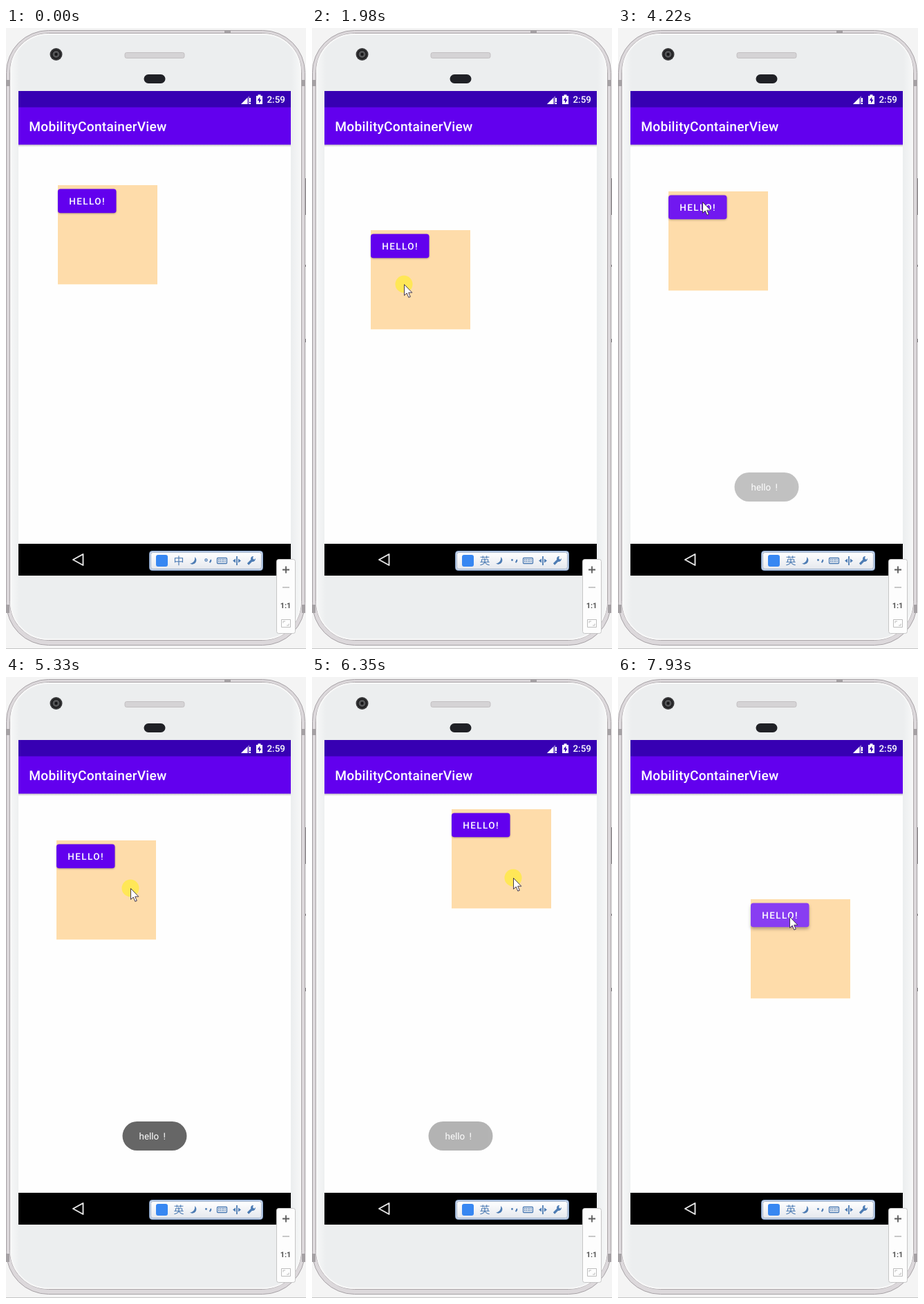
An HTML page that plays this animation: 434 px wide and 897 px high, repeating every 8000 ms.

```html
<!DOCTYPE html>
<html lang="en">
<head>
<meta charset="utf-8">
<title>MobilityContainerView</title>
<style>
  html, body { margin: 0; width: 100%; height: 100%; overflow: hidden; background: #f4f4f4; }
  svg { display: block; width: 434px; height: 897px; }
  text { font-family: Roboto, sans-serif; font-size: 13.4px; fill: #fff; text-rendering: geometricPrecision; }
  .medium { font-weight: 500; }
  .title { font-size: 19.16px; letter-spacing: .24px; }
  .caps { letter-spacing: 1.5px; }
  .line { fill: none; }
  #mode { font: 15px "Noto Sans CJK SC", "Noto Sans CJK", sans-serif; fill: #4d7cb4; text-anchor: middle; }
  .ratio { font-size: 11px; font-weight: 700; fill: #555; text-anchor: middle; }
</style>
</head>
<body>
<svg viewBox="0 0 434 897">
  <defs>
    <linearGradient id="face">
      <stop offset="0" stop-color="#f7f8f8"/><stop offset=".035" stop-color="#eceeef"/>
      <stop offset=".965" stop-color="#eceeef"/><stop offset="1" stop-color="#f7f8f8"/>
    </linearGradient>
    <linearGradient id="barShade" x2="0" y2="1">
      <stop offset="0" stop-opacity=".25"/><stop offset="1" stop-opacity="0"/>
    </linearGradient>
    <linearGradient id="imeFill" x2="0" y2="1">
      <stop offset="0" stop-color="#fff"/><stop offset="1" stop-color="#e5e8ee"/>
    </linearGradient>
  </defs>

  <!-- Phone -->
  <path d="M0 896.5H434" stroke="#c4c4c4"/>
  <path d="M432 217h2v53h-2zM432 342h2v3h-2zM432 449h2v5h-2z" fill="#8f8b8e"/>
  <rect x=".5" y="3.500" width="432" height="888" rx="61" fill="#dcd8db" stroke="#a7a2a6"/>
  <path d="M316 3h9v5h-9zM0 75h5v9H0zM428 75h5v9h-5zM0 833h5v12H0zM428 833h5v12h-5z" fill="#a5a1a4"/>
  <rect x="5.500" y="7.500" width="422" height="877" rx="56" fill="url(#face)" stroke="#aaa5a8"/>
  <rect x="7" y="9" width="419" height="874" rx="54" class="line" stroke="#f8f8f8" stroke-width="2"/>
  <g transform="translate(72.500 38)">
    <circle r="9" fill="#39393b"/>
    <circle r="6" fill="#555658" stroke="#202022" stroke-width="2"/>
    <circle r="2.200" fill="#171719"/>
  </g>
  <rect x="172" y="35.500" width="86" height="8" rx="2.500" fill="#d5d3d5" stroke="#c3c0c2"/>
  <rect x="199.500" y="67" width="31" height="13" rx="6.500" fill="#202126"/>

  <!-- Screen -->
  <path d="M18 91H412V791H18z" fill="#fefefe"/>
  <path d="M18 168H412V172H18z" fill="url(#barShade)"/>
  <path d="M18 91H412V168.500H18z" fill="#6200ee"/>
  <path d="M18 91H412V114.500H18z" fill="#3700b3"/>
  <path d="M18 745H412V791H18z"/>
  <g fill="#fff">
    <path d="M340 110L352 98V110z" opacity=".45"/>
    <path d="M340 110L349 101V110zM352 101h2v6h-2zM352 108h2v2h-2z"/>
    <path d="M362 98h2.500v-1.700h4V98H371v12H362z"/>
  </g>
  <path d="M367.300 99.500L363.700 104.700H366V108.700L369.500 103.500H367.300z" fill="#3700b3"/>
  <text class="medium" x="377.500" y="108">2:59</text>
  <text class="medium title" x="33.300" y="149">MobilityContainerView</text>
  <path d="M97 768L111.500 760V776z" class="line" stroke="#e6e6e6" stroke-width="1.900" stroke-linejoin="round"/>

  <g id="box">
    <rect width="144" height="143.300" fill="#fedcaa"/>
    <rect id="button" y="5.500" width="84.500" height="34.800" rx="3.800" fill="#6200ee"/>
    <text class="medium caps" x="16.200" y="28">HELLO!</text>
  </g>

  <g id="toast">
    <rect x="168.500" y="642" width="93" height="42" rx="21" fill="#666"/>
    <text x="192.500" y="668">hello<tspan x="227.500">!</tspan></text>
  </g>

  <!-- Input method bar -->
  <rect x="207.500" y="755.500" width="164" height="28" rx="4" fill="#d4e0f1" stroke="#7796c2"/>
  <rect x="209.500" y="757.500" width="160" height="24" rx="3" fill="url(#imeFill)" stroke="#9fb1cb"/>
  <rect x="217" y="761" width="17" height="17" rx="3" fill="#3787f2"/>
  <text id="mode" x="250" y="775"></text>
  <g fill="#4d7cb4">
    <path d="M273 764A5.700 5.700 0 1 1 266 773.500C271 773 274 769 273 764z"/>
    <path d="M328 769.500l4-3v6zM340 769.500l-4-3v6z"/>
    <path d="M354 767q0-4 4-4l-1 3 2 2 2-2q0 5-5 5z"/>
  </g>
  <g class="line" stroke="#4d7cb4" stroke-width="1.300">
    <circle id="stop" cx="289.500" cy="768.500"/>
    <path d="M296 768q1 2-1.500 4" stroke-width="2"/>
    <rect x="305.500" y="765.500" width="14" height="8" rx="1"/>
    <path d="M307 768H318M307 770.500H318" stroke-dasharray="1.500 1"/>
    <path d="M334 763V776" stroke-width="1.800"/>
    <path d="M350 774.500L356 768.500" stroke-width="3.200"/>
  </g>

  <!-- Emulator zoom panel -->
  <rect x="391.500" y="767.500" width="27" height="107" rx="3" fill="#fdfdfd" stroke="#c6c6c6"/>
  <path d="M400 782.500H410M405 777.500V787.500" stroke="#5c5c5c" stroke-width="1.800"/>
  <path d="M400 808H410" stroke="#bbb" stroke-width="1.600"/>
  <text class="ratio" x="404.500" y="838">1:1</text>
  <path d="M398.500 854.500h13v11h-13zM401 859.500V857H404M406 863H409V860.500" class="line" stroke="#bdbdbd"/>

  <g id="cursor">
    <circle id="press" r="12.500" fill="#ffeb3b" fill-opacity=".75"/>
    <path d="M.5.500V16.300L4.200 13 6.800 19.200 9.300 18.200 6.700 12.200H11.800z" fill="#fff" stroke="#33263f" stroke-width=".9"/>
  </g>
</svg>
<script>
  const LOOP = 8000;
  const el = id => document.getElementById(id);
  const [box, button, toast, mode, stop, cursor, press] =
    ['box', 'button', 'toast', 'mode', 'stop', 'cursor', 'press'].map(el);

  const ramp = (t, from, to) => Math.min(1, Math.max(0, (t - from) / (to - from)));
  const ease = k => k * k * (3 - 2 * k);
  const mix = (a, b, k) => a + (b - a) * k;

  // The pointer rests between glides; each one eases to a new spot.
  const entry = { x: 200, y: 649 };
  const home = { x: 75, y: 227 };
  const glides = [];
  const glide = (start, end, x, y) => glides.push({ start, end, x, y });
  glide(430, 970, 123, 305);
  glide(1220, 1540, 94, 334);
  glide(1540, 1815, 133, 370);
  glide(2060, 2450, 121, 314);
  glide(3240, 3580, 122, 251);
  glide(4350, 4840, 162, 335);
  glide(5165, 5330, 180, 305);
  glide(5330, 5790, 291, 290);
  glide(6400, 6600, 235, 405);
  glide(6660, 6760, 280, 406);
  glide(6760, 6850, 281, 420);
  glide(7080, 7520, 248, 346);

  // The box repeats each stretch of pointer travel a little later.
  const drags = [
    { from: 1220, to: 1815, shownFrom: 1320, shownTo: 1980 },
    { from: 2060, to: 2450, shownFrom: 2690, shownTo: 2890 },
    { from: 5165, to: 5790, shownFrom: 5335, shownTo: 5950 },
    { from: 6400, to: 6850, shownFrom: 6560, shownTo: 7010 }
  ];
  const holds = [[1220, 2060], [3560, 3800], [5140, 7000], [7520, 7850]];

  function pointerAt(t) {
    return glides.reduce((at, g) => {
      const k = ease(ramp(t, g.start, g.end));
      return { x: mix(at.x, g.x, k), y: mix(at.y, g.y, k) };
    }, entry);
  }

  function boxAt(t) {
    return drags.reduce((at, d) => {
      const grab = pointerAt(d.from);
      const now = pointerAt(mix(d.from, d.to, ramp(t, d.shownFrom, d.shownTo)));
      return { x: at.x + now.x - grab.x, y: at.y + now.y - grab.y };
    }, home);
  }

  const place = (node, { x, y }) => node.setAttribute('transform', `translate(${x} ${y})`);
  const show = (node, on) => node.style.display = on ? '' : 'none';

  function draw(t) {
    place(box, boxAt(t));
    place(cursor, pointerAt(t));
    show(cursor, t >= 430);
    show(press, holds.some(([from, to]) => t >= from && t < to));

    const lift = ramp(t, 3740, 3900) - ramp(t, 4070, 4320) + ramp(t, 7670, 7920);
    button.style.fill = `color-mix(in srgb, #6200ee, #fff ${24 * lift}%)`;
    button.style.filter = `drop-shadow(0 ${1 + 2 * lift}px ${1 + lift}px rgba(0,0,0,.28))`;
    toast.style.opacity = ramp(t, 4070, 4450) - ramp(t, 6040, 6650);

    const english = t >= 1220;
    mode.textContent = english ? '英' : '中';
    stop.setAttribute('r', english ? 0.8 : 1.6);
  }

  function tick(now) {
    draw(now % LOOP);
    requestAnimationFrame(tick);
  }
  draw(0);
  requestAnimationFrame(tick);
</script>
</body>
</html>
```
